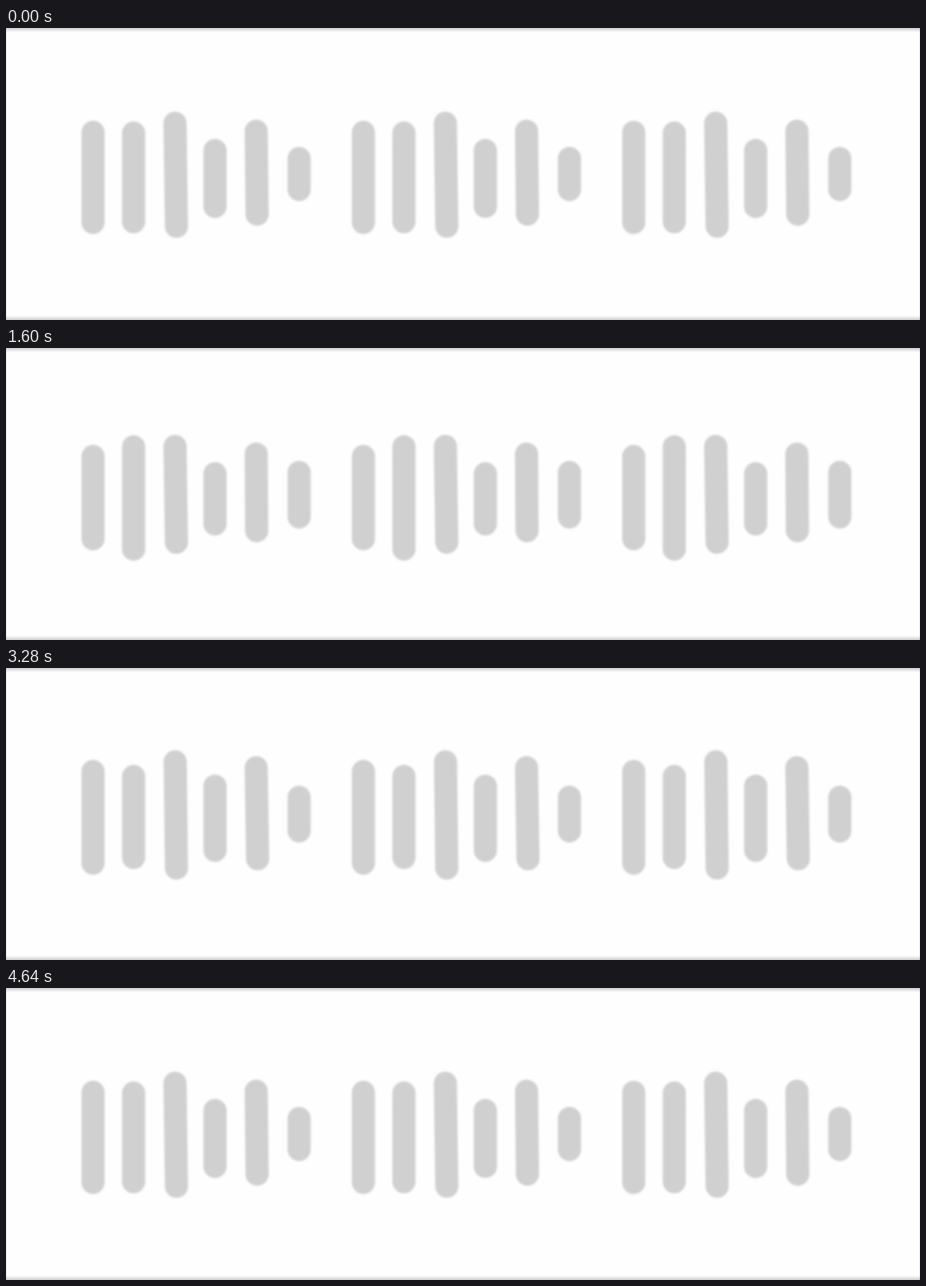
These frames come from a looping animation (1280 by 410 pixels, 4.72 s). An HTML page with a canvas:

```html
<!DOCTYPE html>
<html lang="en">
<head>
<meta charset="utf-8">
<title>Sound bars</title>
<style>
  html, body { margin: 0; width: 100%; height: 100%; overflow: hidden; background: #fefefe; }
  canvas { display: block; }
</style>
</head>
<body>
<canvas id="stage" width="1280" height="410"></canvas>
<script>
const ctx = document.getElementById('stage').getContext('2d');
const W = 1280, H = 410, LOOP = 4720, STEP = 80, CYCLE = 1440;
const THICK = 32.4, GROUPS = 3, GROUP_GAP = 378.6;
const TENSION = 0.6;

// Key times of one cycle; each bar passes through its heights at these times
const KEYS = [0, 160, 320, 640, 840];

// x, mid: centre of a bar 150 high; drift: centre shift per pixel of height;
// lean: reach at which the upper end tips right
const bars = [
  { x: 121.9, mid: 210, drift: -0.03, heights: [220, 148, 159, 166, 173] },
  { x: 178.7, mid: 209.3, drift: 0.05, heights: [66, 176, 157, 108, 108] },
  { x: 236.7, mid: 204.6, drift: 0.055, heights: [139, 167, 177, 198, 210], lean: 89 },
  { x: 292.7, mid: 210, drift: -0.035, heights: [196, 103, 111, 173, 173], lean: 62 },
  { x: 350.4, mid: 203.3, drift: 0.06, heights: [166, 140, 149, 209, 210], lean: 89 },
  { x: 410.5, mid: 209, drift: 0.055, heights: [139, 95, 76, 109, 109] }
];

const wrap = i => (i + KEYS.length) % KEYS.length;
const span = i => (KEYS[wrap(i + 1)] - KEYS[wrap(i)] + CYCLE) % CYCLE;
const slope = (v, i) => (v[wrap(i + 1)] - v[wrap(i)]) / span(i);
const clamp = v => Math.max(0, Math.min(1, v));

function tangent(v, i) {
  const before = span(i - 1), after = span(i);
  return TENSION * (slope(v, i) * before + slope(v, i - 1) * after) / (before + after);
}

// Smooth closed curve through the key heights
function sample(v, phase) {
  const i = KEYS.findLastIndex(k => k <= phase);
  const d = span(i), u = (phase - KEYS[i]) / d, rest = 1 - u;
  return v[i] * (1 + 2 * u) * rest * rest
    + v[wrap(i + 1)] * u * u * (3 - 2 * u)
    + d * u * rest * (rest * tangent(v, i) - u * tangent(v, i + 1));
}

function drawBackground() {
  ctx.fillStyle = '#fefefe';
  ctx.fillRect(0, 0, W, H);
  const shade = ctx.createLinearGradient(0, 0, 0, H);
  for (const [y, alpha] of [[0, 0.19], [2, 0.13], [6, 0]]) {
    shade.addColorStop(y / H, `rgba(0,0,0,${alpha})`);
    shade.addColorStop(1 - y / H, `rgba(0,0,0,${alpha})`);
  }
  ctx.fillStyle = shade;
  ctx.fillRect(0, 0, W, H);
  ctx.fillStyle = 'rgba(0,0,0,0.09)';
  ctx.fillRect(0, 0, 1, H);
  ctx.fillRect(W - 1, 0, 1, H);
}

function addBar({ x, mid, drift, heights, lean }, phase) {
  const height = sample(heights, phase);
  const centre = mid + drift * (height - 150);
  const half = height / 2 - THICK / 2;
  const tip = from => lean ? 2 * clamp((height / 2 - from) / 15) : 0;
  for (let g = 0; g < GROUPS; g++) {
    const left = x + g * GROUP_GAP;
    ctx.moveTo(left + tip(lean), centre - half);
    ctx.lineTo(left + tip(65), centre + half);
  }
}

function draw(time) {
  // The opening runs at half speed
  const phase = (time < 640 ? 320 + time / 2 : time) % CYCLE;
  drawBackground();
  ctx.save();
  ctx.filter = 'blur(1.4px)';
  ctx.strokeStyle = '#d0d0d0';
  ctx.lineWidth = THICK;
  ctx.lineCap = 'round';
  ctx.beginPath();
  for (const bar of bars) addBar(bar, phase);
  ctx.stroke();
  ctx.restore();
}

const start = performance.now();
function tick() {
  const time = (performance.now() - start) % LOOP;
  draw(Math.floor(time / STEP) * STEP);
  requestAnimationFrame(tick);
}
tick();
</script>
</body>
</html>
```
